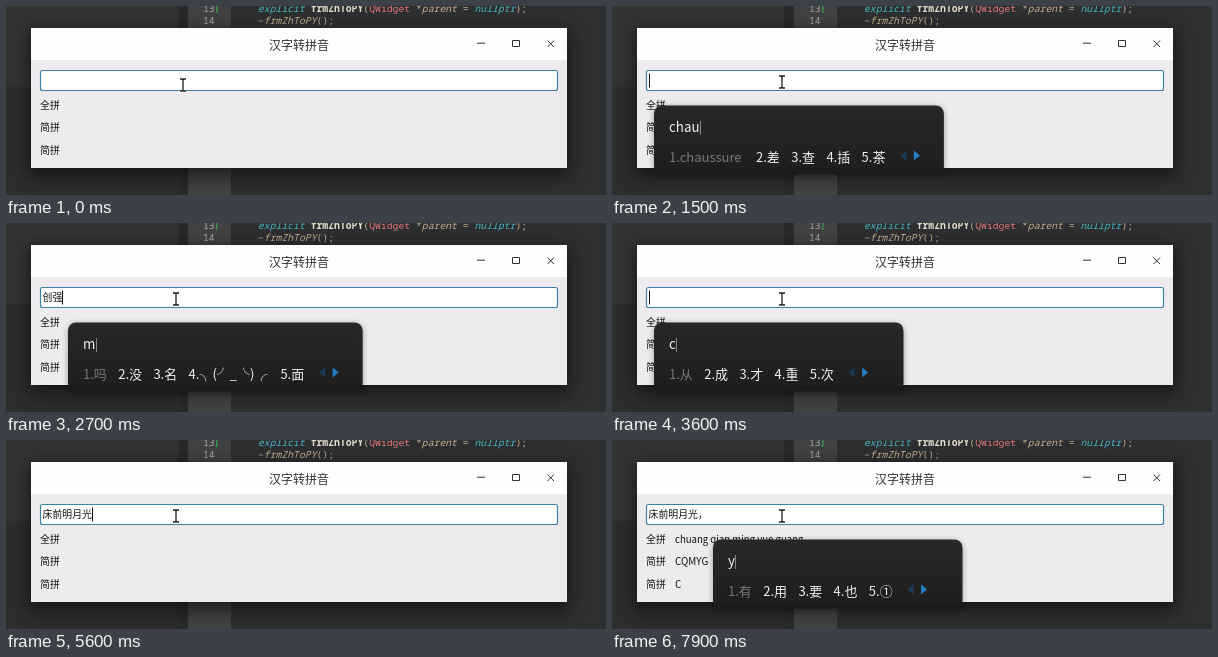
Animation, 600 px wide and 189 px high, one loop 8000 ms. Source, as an HTML page:

```html
<!DOCTYPE html>
<html lang="zh-CN">
<head>
<meta charset="utf-8">
<style>
html, body { margin: 0; width: 100%; height: 100%; overflow: hidden; background: #2b2b2c; }
svg { display: block; }
text { font-family: "Noto Sans CJK SC", "Noto Sans", sans-serif; white-space: pre; }
.code text { font: 9.75px "Noto Sans Mono", monospace; fill: #c8b090; }
.code .num { fill: #a9abad; }
.key { fill: #45b4c4; font-style: italic; }
.fn { fill: #e6dfd0; font-weight: bold; }
.type { fill: #e87878; }
.it { font-style: italic; }
.ui text { font-size: 9.9px; font-weight: 500; fill: #111; }
.ui .title { font-size: 12px; font-weight: 400; fill: #303030; }
.btn { fill: none; stroke: #333; }
.pre { font-size: 13.33px; font-weight: 500; fill: #f4f4f4; }
.cand { font-size: 13px; font-weight: 500; fill: #f0f0f0; }
.cand tspan:first-child { fill: #787878; }
</style>
</head>
<body>
<svg width="600" height="189" viewBox="0 0 600 189">
  <defs>
    <filter id="soft" x="-10%" y="-30%" width="120%" height="160%"><feGaussianBlur stdDeviation="9"/></filter>
    <filter id="near" x="-10%" y="-20%" width="120%" height="140%"><feGaussianBlur stdDeviation="3"/></filter>
    <linearGradient id="dark" x2="0" y2="1">
      <stop stop-color="#252426"/><stop offset="1" stop-color="#1c1b1c"/>
    </linearGradient>
  </defs>
  <g class="code">
    <rect width="600" height="189" fill="#2e2f30"/>
    <rect width="172" height="189" fill="#333334"/>
    <rect y="81" width="172" height="108" fill="#2d2d2e"/>
    <rect x="172" width="10" height="189" fill="#292a2b"/>
    <rect x="182" width="43" height="189" fill="#404244"/>
    <rect x="210" width="1.5" height="7" fill="#3f8f4c"/>
    <text class="num" x="197" y="6">13</text>
    <text class="num" x="197" y="18">14</text>
    <text x="252" y="6.4"><tspan class="key">explicit</tspan> <tspan class="fn">frmZhToPY</tspan>(<tspan class="type">QWidget</tspan> *<tspan class="it">parent</tspan> = <tspan class="key">nullptr</tspan>);</text>
    <text x="252" y="18">~<tspan class="it">frmZhToPY</tspan>();</text>
  </g>
  <g class="ui">
    <rect x="23" y="25" width="540" height="145" fill="#000" opacity=".55" filter="url(#soft)"/>
    <rect x="25" y="22" width="536" height="140" fill="#edebee"/>
    <rect x="25" y="22" width="536" height="32" fill="#fefefe"/>
    <text class="title" x="293" y="44.4" text-anchor="middle">汉字转拼音</text>
    <path class="btn" d="M471 37.2h8M506.5 34.5h7v6h-7zM541.5 34.5l6.5 6.5m0-6.5l-6.5 6.5"/>
    <rect x="34.5" y="64.5" width="517" height="20" rx="2" fill="#fff" stroke="#3f81a2" stroke-width="1.2"/>
    <text id="entry" x="36.5" y="78.2"></text>
    <rect id="caret" y="67.5" width="1" height="14" fill="#111"/>
    <text x="34" y="102.7">全拼</text>
    <text x="34" y="125.2">简拼</text>
    <text x="34" y="147.9">简拼</text>
    <g id="result">
      <text x="63" y="102.5" style="font-size:9.6px">chuang qian ming yue guang</text>
      <text x="63" y="125">CQMYG</text>
      <text x="63" y="147.7">C</text>
    </g>
  </g>
  <g id="popup">
    <rect class="panel" y="101" height="67" rx="8" fill="#000" opacity=".35" filter="url(#near)"/>
    <rect class="panel" y="99.5" height="69" rx="8" fill="url(#dark)" fill-opacity=".98"/>
    <text class="pre" id="pre" y="125.5"></text>
    <rect id="preCaret" y="115" width="1" height="14" fill="#858585"/>
    <text class="cand" id="cand" y="156.3"></text>
    <g id="arrows">
      <path d="M21 144.5v10l-6-5z" fill="#1b3c58"/>
      <path d="M28.5 144.5v10l6-5z" fill="#2480c4"/>
    </g>
  </g>
  <g id="mouse" fill="none">
    <path id="beam" d="M-3 -6h2.2l.8 .8l.8 -.8h2.2M0 -5.2v10.4M-3 6h2.2l.8 -.8l.8 .8h2.2"/>
  </g>
</svg>
<script>
const LOOP = 8000;
const $ = id => document.getElementById(id);
const panels = document.querySelectorAll('.panel');

// time, entry text, caret shown
const entries = [
  [0, '', 0], [400, '', 1],
  [2400, '创强', 1], [3100, '创', 1], [3200, '', 1],
  [5600, '床前明月光', 1], [6500, '床前明月光', 0], [6700, '床前明月光', 1],
  [7000, '床前明月光，', 1], [7800, '床前明月光，', 0]
];

// time, typed letters, candidates
const first = '从 成 才 重 次';
const typing = [
  [0], [1000, 'c', first],
  [1200, 'ch', '成 吃 出 长 车'],
  [1300, 'cha', '差 查 插 茶 叉'],
  [1500, 'chau', 'chaussure 差 查 插 茶'],
  [1600, 'ch', '成 吃 出 长 车'],
  [1700, 'chu', '出 处 除 初 楚'],
  [1800, 'chuan', '穿 传说 传统 船长 传染病'],
  [1900, 'chuang', '创 床 窗 闯 创新'],
  [2100, "chuang'q", '床前 创强 窗前 创 床前明月光'],
  [2400],
  [2700, 'm', '吗 没 名 ╮(╯_╰)╭ 面'],
  [3000],
  [3500, 'c', first],
  [4000, "c'q", '出去 长期 才 重庆 此前'],
  [4400, "c'q'm", '出去吗 出去买 从前慢 长期没 重庆美'],
  [4800, "c'q'm'y", '长期没有 床前明月光 出去吗 出去买 从前慢'],
  [5300, "c'q'm'y'g", '床前明月光 长期没有 出去没有 才去买药 从前没有'],
  [5600],
  [7800, 'y', '有 用 要 也 ①']
];

const at = (list, t) => list.findLast(s => s[0] <= t);
const put = (el, name, v) => el.setAttribute(name, v);
const charW = c => c > '\u2000' ? 13 : '()'.includes(c) ? 5.2 : 7.2;
const wordW = w => 10.8 + [...w].reduce((sum, c) => sum + charW(c), 0);

let shown;

function drawPopup(step, left) {
  const [, letters, words] = step;
  $('popup').style.display = letters ? '' : 'none';
  if (!letters || shown === step) return;
  shown = step;
  const start = left + 15;
  put($('pre'), 'x', start);
  $('pre').textContent = letters;
  put($('preCaret'), 'x', Math.round(start + $('pre').getComputedTextLength() + 0.5));
  let x = start, end = x;
  $('cand').replaceChildren(...words.split(' ').map((w, i) => {
    const span = document.createElementNS('http://www.w3.org/2000/svg', 'tspan');
    put(span, 'x', x);
    span.textContent = `${i + 1}.${w}`;
    end = x + wordW(w);
    x = end + 11.4;
    return span;
  }));
  put($('arrows'), 'transform', `translate(${end},0)`);
  const width = Math.max(249.5, end + 58.5 - left);
  for (const p of panels) {
    put(p, 'x', left);
    put(p, 'width', width);
  }
}

function draw(t) {
  const [, text, caretOn] = at(entries, t);
  const caretX = 36.5 + text.length * 9.9;
  $('entry').textContent = text;
  put($('caret'), 'x', Math.round(caretX));
  put($('caret'), 'opacity', caretOn);
  put($('result'), 'opacity', t >= 5900 ? 1 : 0);
  drawPopup(at(typing, t), Math.round(caretX + 5.3));
  const m = Math.min(1, Math.floor(t / 100) / 2);
  put($('mouse'), 'transform', `translate(${177 - 7 * m},${79 - 3 * m})`);
}

// dark beam over a white halo
const halo = $('beam').cloneNode();
halo.removeAttribute('id');
put(halo, 'stroke', '#fff');
put(halo, 'stroke-width', 2.8);
$('beam').before(halo);
put($('beam'), 'stroke', '#1a1a1a');
put($('beam'), 'stroke-width', 1.3);

const began = performance.now();
function tick() {
  draw((performance.now() - began) % LOOP);
  requestAnimationFrame(tick);
}
tick();
</script>
</body>
</html>
```
